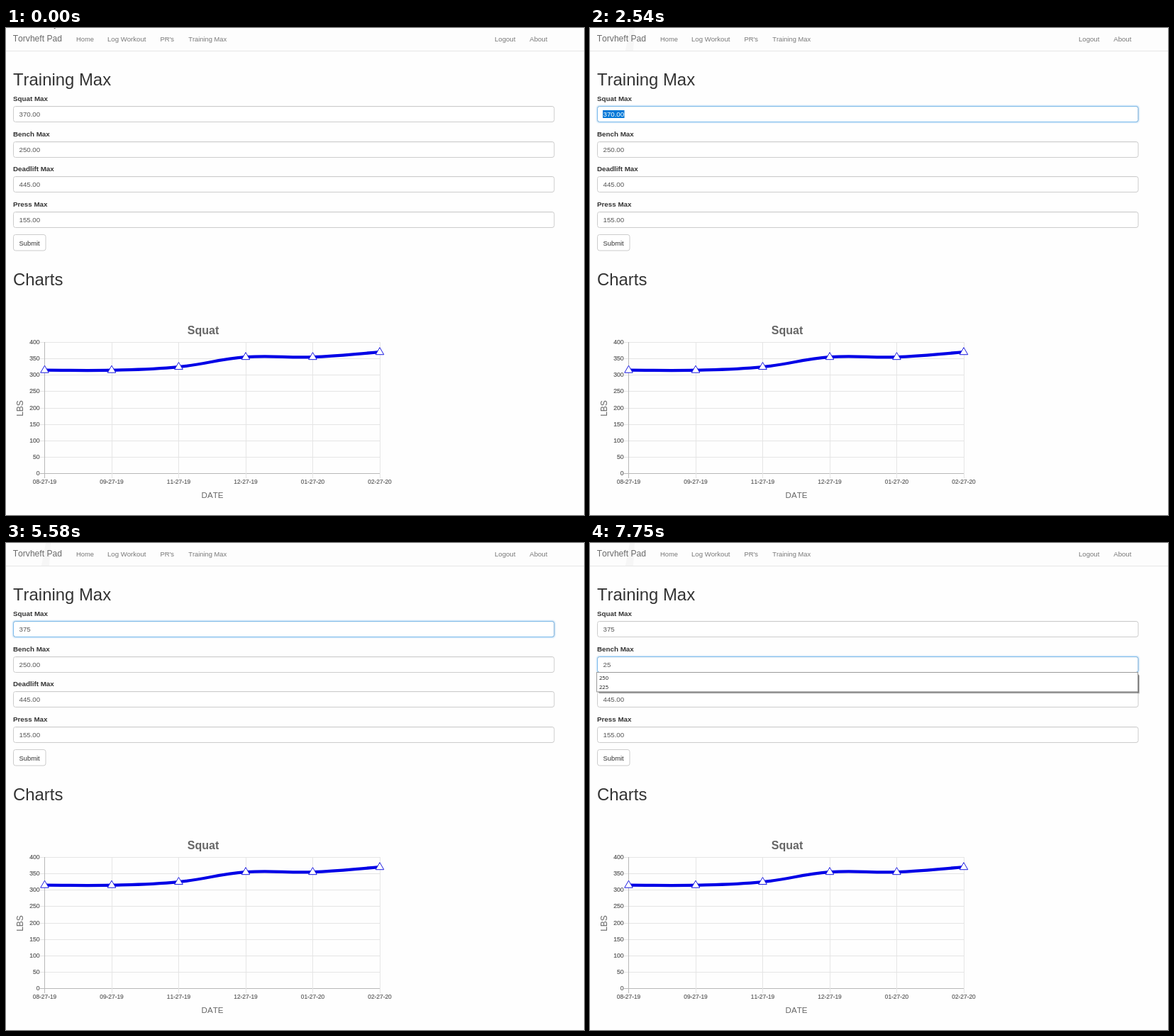
An HTML page for the animation above (8000 ms loop, 815x687 px).

```html
<!DOCTYPE html>
<html lang="en">
<head>
<meta charset="utf-8">
<title>Training Max</title>
<style>
  html, body { margin: 0; width: 100%; height: 100%; overflow: hidden; background: #fefefe; }
  svg { display: block; font-family: "Liberation Sans", Arial, sans-serif; font-kerning: none; }
  .menu text { font-family: "Open Sans", sans-serif; }
</style>
</head>
<body>
<svg id="stage" width="815" height="687" viewBox="0 0 815 687"><g id="page"></g><g id="live"></g></svg>
<script>
const LOOP = 8000;
const ROWS = [110, 160, 209, 259];
const LABELS = ["Squat Max", "Bench Max", "Deadlift Max", "Press Max"];

const text = (x, y, size, fill, s, extra = "") =>
  `<text x="${x}" y="${y}" font-size="${size}" fill="${fill}" ${extra}>${s}</text>`;
const rect = (x, y, w, h, fill, extra = "") =>
  `<rect x="${x}" y="${y}" width="${w}" height="${h}" fill="${fill}" ${extra}/>`;
const path = (d, stroke, width = 1, fill = "none") =>
  `<path d="${d}" stroke="${stroke}" stroke-width="${width}" fill="${fill}"/>`;

function chart() {
  const gx = i => 54.5 + i * 94.5;
  const gy = v => 628.7 - v * 0.4635;
  const dates = ["08-27-19", "09-27-19", "11-27-19", "12-27-19", "01-27-20", "02-27-20"];
  const pts = [315, 315, 325, 355, 355, 370].map((v, i) => [gx(i), gy(v)]);
  let out = "";
  for (let v = 0; v <= 400; v += 50) {
    const y = Math.floor(gy(v)) + 0.5;
    out += path(`M48 ${y}H527.5`, v ? "#e5e5e5" : "#b8b8b8");
    out += text(47.5, y + 2.6, 8.6, "#555", v, 'text-anchor="end" stroke="#555" stroke-width=".2"');
  }
  dates.forEach((d, i) => {
    const x = Math.floor(gx(i)) + 0.5;
    out += path(`M${x} 443V635`, i ? "#e5e5e5" : "#b8b8b8");
    out += text(gx(i), 643, 8.4, "#555", d, 'text-anchor="middle" stroke="#555" stroke-width=".15"');
  });
  // Smooth curve: each tangent follows the chord between the neighbouring points.
  const tangent = i => {
    const a = pts[Math.max(i - 1, 0)], b = pts[Math.min(i + 1, pts.length - 1)];
    const k = i % (pts.length - 1) ? 0.2 : 0.4;
    return [k * (b[0] - a[0]), k * (b[1] - a[1])];
  };
  let d = `M${pts[0]}`;
  for (let i = 1; i < pts.length; i++) {
    const [p, q, u, v] = [pts[i - 1], pts[i], tangent(i - 1), tangent(i)];
    d += `C${p[0] + u[0]} ${p[1] + u[1]} ${q[0] - v[0]} ${q[1] - v[1]} ${q}`;
  }
  out += path(d, "#0000e6", 4.3);
  for (const [x, y] of pts)
    out += path(`M${x} ${y - 6.5}l5.8 10h-11.6z`, "#1a1ae0", 1, "#fff");
  return out +
    text(278, 432, 16, "#666", "Squat", 'text-anchor="middle" font-weight="bold"') +
    text(291, 662.5, 11.6, "#666", "DATE", 'text-anchor="middle"') +
    text(0, 0, 12, "#666", "LBS", 'text-anchor="middle" transform="translate(23.5 536.5) rotate(-90)"');
}

function page() {
  const links = [[99, "Home", 9.3], [143, "Log Workout", 9.6], [217.5, "PR's", 9.4],
                 [257.3, "Training Max", 9.3], [689, "Logout", 9.6], [738.3, "About", 9.6]];
  return rect(0, 0, 815, 32, "#fdfdfd") + path("M0 32.5H815", "#e7e7e7") +
    links.map(([x, s, size]) => text(x, 19, size, "#777", s)).join("") +
    text(10, 81, 23.9, "#333", "Training Max") +
    LABELS.map((s, i) => text(10, ROWS[i] - 6.7, 9.8, "#333", s, 'font-weight="bold"')).join("") +
    rect(10.5, 291.5, 45.5, 22.5, "#fff", 'rx="3" stroke="#ccc"') +
    text(18.5, 306.5, 9.4, "#333", "Submit") +
    text(10, 362.5, 23.9, "#333", "Charts") + chart();
}

function field(i, value, glow, selected) {
  const y = ROWS[i] + 0.5;
  const box = (fill, stroke, width, alpha) =>
    rect(10.5, y, 762.5, 22, fill, `rx="3" stroke="${stroke}" stroke-width="${width}" stroke-opacity="${alpha}"`);
  // The glow lies behind the white box, so only its outer half shows.
  let out = glow ? box("none", "#66afe9", 5, 0.1 * glow) + box("none", "#66afe9", 3, 0.15 * glow) : "";
  out += box("#fff", "#ccc", 1, 1) + path(`M12 ${y + 1}H771`, "#f6f6f6");
  if (glow) out += box("none", "#7dbbec", 1, glow);
  if (selected) out += rect(18, y + 5.5, 30.5, 11, "#0078d7");
  return out + text(18.5, y + 14.2, 9.7, selected ? "#fff" : "#555", value);
}

function menu(row, items) {
  const top = ROWS[row] + 22.5, h = items.length * 13.4 + 0.6;
  let out = rect(13, top + 4, 762, h - 1.5, "#000", 'opacity=".22"') +
    rect(12, top + 3, 762, h - 1.5, "#000", 'opacity=".4"') +
    rect(9.5, top, 763, h, "#fff", 'stroke="#999"');
  items.forEach((s, i) => out += text(13, top + 10.4 + i * 13.4, 7.6, "#111", s));
  if (items.length > 5)
    out += rect(761, top + 0.5, 11, h - 1, "#f0f0f0") + rect(761.5, top + 11.5, 10, 48, "#cdcdcd") +
      path(`M764 ${top + 7.5}l2.5 -2.5l2.5 2.5M764 ${top + h - 7}l2.5 2.5l2.5 -2.5`, "#444", 1.2);
  return `<g class="menu">${out}</g>`;
}

// Each step changes part of the form's state at its time.
const STEPS = [
  [0, { values: ["370.00", "250.00", "445.00", "155.00"], glow: [0, 0], row: 0, selected: false, caret: false, items: [] }],
  [2390, { glow: [0.35, 0] }],
  [2470, { glow: [0.7, 0], selected: true }],
  [2540, { glow: [1, 0] }],
  [3720, { typed: "3", selected: false, caret: true }],
  [3800, { items: [355, 370, 345, 335, 350, 325] }],
  [4040, { caret: false }],
  [4560, { caret: true }],
  [5120, { typed: "37" }],
  [5190, { items: [370] }],
  [5340, { typed: "375" }],
  [5430, { items: [] }],
  [5580, { caret: false }],
  [6120, { row: 1, selected: true, glow: [0.7, 0.35] }],
  [6200, { glow: [0.35, 0.7] }],
  [6270, { glow: [0, 1] }],
  [7050, { typed: "2", selected: false, caret: true }],
  [7140, { items: [250, 225, 245, 235, 240, 230] }],
  [7370, { typed: "25" }],
  [7450, { items: [250, 225] }],
  [7750, { caret: false }]
];

function formAt(t) {
  const s = {};
  for (const [start, { typed, ...patch }] of STEPS) {
    if (start > t) break;
    Object.assign(s, patch);
    if (typed) s.values = s.values.map((v, i) => i === s.row ? typed : v);
  }
  return s;
}

// Pointer keys: time, x, y
const MOVES = [[610, 64, -12], [900, 58, 3], [1150, 54, 27], [1380, 46, 68.5],
               [1640, 18, 96], [1850, 32, 114], [2070, 63, 124], [2230, 63, 124]];

function pointerAt(t) {
  if (t < 610) return MOVES[0].slice(1);
  const now = Math.min(610 + Math.floor((t - 610) / 77 + 1) * 77, 2230);
  const i = Math.max(1, MOVES.findIndex(m => m[0] >= now));
  const [a, b] = [MOVES[i - 1], MOVES[i]];
  const k = (now - a[0]) / (b[0] - a[0]);
  return [a[1] + (b[1] - a[1]) * k, a[2] + (b[2] - a[2]) * k];
}

function pointer([x, y]) {
  const at = `M${x} ${y}`;
  if (y >= 60)
    return path(`M${x - 2.5} ${y - 5.5}h2q.5 0 .5 1q0 -1 .5 -1h2M${x} ${y - 5}v10M${x - 2.5} ${y + 5.5}h2q.5 0 .5 -1q0 1 .5 1h2`, "#333");
  if (y >= 0 && y < 32)
    return path(`${at}q1.2 0 1.2 1.2v4l4 1q1.3 .4 1.2 2l-.8 4.8h-5.6l-3.6 -5q0 -1.6 2.4 .2v-7q0 -1.2 1.2 -1.2z`, "#222", 0.8, "#fff");
  return path(`${at}v11l2.5 -2.3l1.7 4l1.7 -.8l-1.6 -3.7h3.4z`, "#222", 0.8, "#fff");
}

function live(t) {
  const s = formAt(t), pos = pointerAt(t);
  const hover = pos[1] >= 0 && pos[1] < 32;
  let out = t > 1150 ? path("M56 0H63L61 32H50z", "none", 0, "#f6f6f6") : "";
  out += text(9.7, 19.3, 12.1, hover ? "#4c4c4c" : "#6a6a6a", "Torvheft Pad");
  out += s.values.map((v, i) => field(i, v, s.glow[i], s.selected && i === s.row)).join("");
  if (s.caret) out += rect(Math.floor(18.9 + s.values[s.row].length * 5.4), ROWS[s.row] + 6, 1, 11, "#222");
  if (s.items.length) out += menu(s.row, s.items);
  if (t < 2390) out += pointer(pos);
  return out;
}

const layer = document.getElementById("live");
document.getElementById("page").innerHTML = page();
let shown = "";
function draw() {
  const next = live(performance.now() % LOOP);
  if (next !== shown) layer.innerHTML = shown = next;
  requestAnimationFrame(draw);
}
draw();
</script>
</body>
</html>
```
